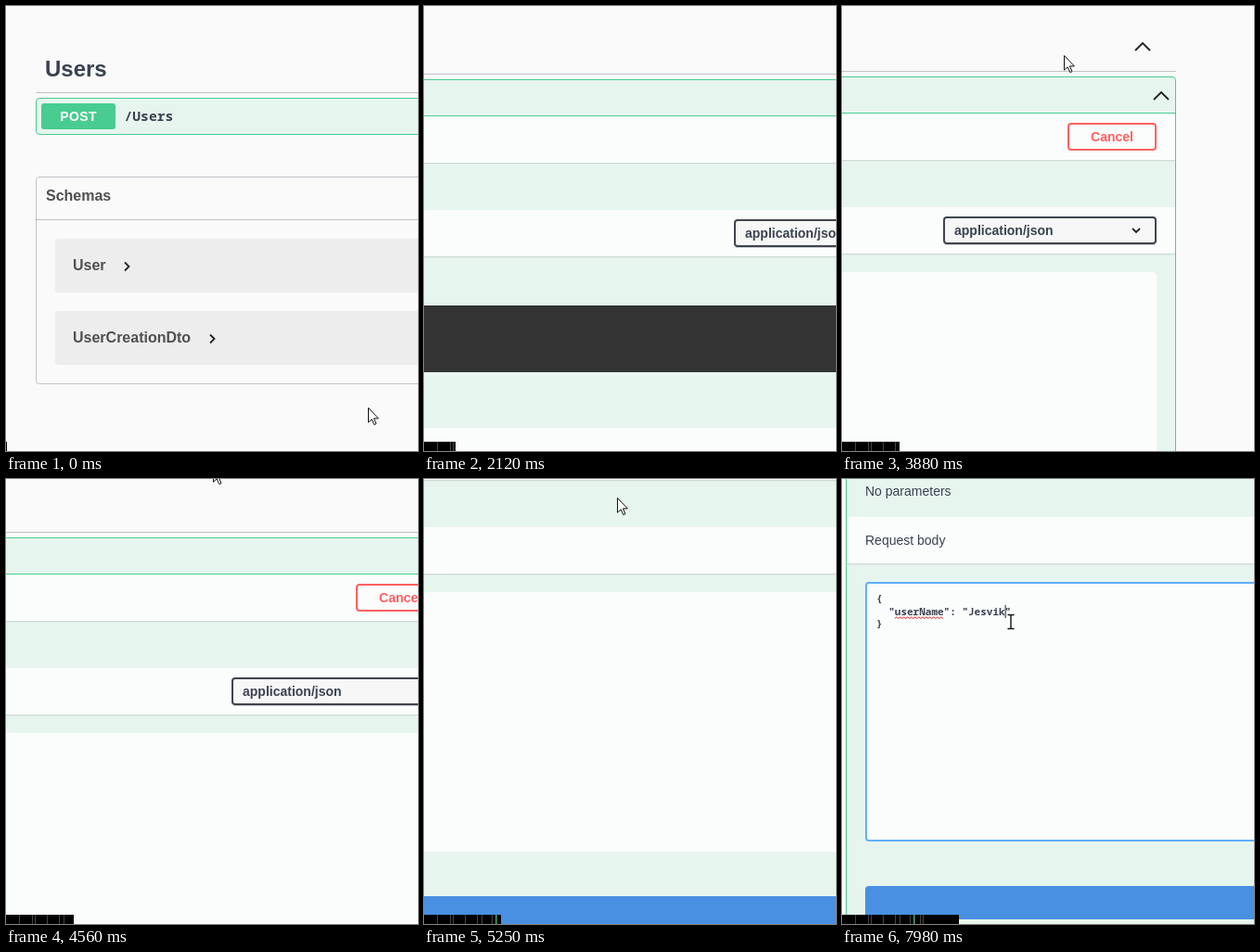
An HTML page that plays this animation: 444 px wide and 480 px high, repeating every 8000 ms.

```html
<!DOCTYPE html>
<html lang="en">
<head>
<meta charset="utf-8">
<title>API docs walkthrough</title>
<style>
html, body { margin: 0; width: 100%; height: 100%; overflow: hidden; background: #fafafa; }
svg { display: block; width: 444px; height: 480px; }
text { font-family: "Liberation Sans", Arial, sans-serif; fill: #3b4151; white-space: pre; }
.mono { font-family: "Noto Sans Mono", "DejaVu Sans Mono", monospace; font-weight: 600; }
.b { font-weight: 700; }
.line { fill: none; stroke: #3b4151; stroke-opacity: .3; }
.chev { fill: none; stroke: #222; stroke-width: 1.8; }
</style>
</head>
<body>
<svg id="stage" viewBox="0 0 444 480"></svg>
<script>
const LOOP = 8000, LEFT = 32, RIGHT = 1452, IN_L = 53, IN_R = 1431;
const CHAR = 6.6, NAME = 'Jesvik', PLACEHOLDER = 'string';
const $ = id => document.getElementById(id);

const rect = (x, y, w, h, fill, extra = '') =>
  `<rect x="${x}" y="${y}" width="${w}" height="${h}" fill="${fill}" ${extra}/>`;
const text = (x, y, size, str, cls = '', extra = '') =>
  `<text x="${x}" y="${y}" font-size="${size}" class="${cls}" ${extra}>${str}</text>`;
const path = (d, cls, extra = '') => `<path d="${d}" class="${cls}" ${extra}/>`;
const group = (id, body) => `<g id="${id}">${body}</g>`;
const frame = (x, y, w, h, stroke, width, fill = 'none', r = 4) =>
  rect(x + width / 2, y + width / 2, w - width, h - width, fill,
    `stroke="${stroke}" stroke-width="${width}" rx="${r - width / 2}"`);

const band = (y, h) =>
  rect(LEFT + 1, y, RIGHT - LEFT - 2, h, '#fff', 'fill-opacity=".8"') +
  rect(LEFT + 1, y + h, RIGHT - LEFT - 2, 1, '#000', 'fill-opacity=".1"') +
  rect(LEFT + 1, y + h + 1, RIGHT - LEFT - 2, 1, '#000', 'fill-opacity=".04"');

const model = (y, name, chevX) =>
  rect(IN_L, y, IN_R - IN_L, 58, '#ededed', 'rx="4"') +
  text(72, y + 34, 16, name, 'b', 'style="fill:#505050"') +
  path(`M${chevX - 3} ${y + 25.5}l4.5 4.5l-4.5 4.5`, 'chev', 'stroke-width="2"');

const opBox = h => frame(LEFT, 99, RIGHT - LEFT, h, '#49cc90', 1, '#e7f5ef');

const summary =
  rect(38, 105, 80, 28, '#49cc90', 'rx="3"') +
  text(78, 124, 14, 'POST', 'b', 'text-anchor="middle" style="fill:#fff" letter-spacing=".4"') +
  text(127.5, 124, 14.67, '/Users', 'mono b');

const closed = opBox(40) +
  frame(LEFT, 184, RIGHT - LEFT, 224, '#c1c3c8', 1) +
  text(43, 210, 16, 'Schemas', 'b', 'style="fill:#505050"') +
  path(`M${LEFT} 230.5H${RIGHT}`, 'line') +
  model(251, 'User', 131) + model(329, 'UserCreationDto', 223);

const opened = opBox(900) +
  rect(LEFT, 138, RIGHT - LEFT, 1, '#49cc90') +
  path('M1428 124l8 -8l8 8', 'chev') +
  band(139, 50) + band(240, 50) +
  text(IN_L, 169, 14, 'Parameters', 'b') + rect(45, 183, 91, 4, '#49cc90') +
  text(IN_L, 217, 14, 'No parameters') + text(IN_L, 270, 14, 'Request body') +
  frame(1201, 250, 230, 30, '#41444e', 2, '#f7f7f7') +
  rect(1203, 280, 226, 1, '#000', 'fill-opacity=".2"') +
  text(1213, 270, 14, 'application/json', 'b') +
  path('M1405 263l4 4l4 -4', 'chev');

const preview =
  text(IN_L, 328, 12, 'Example Value', 'b') +
  rect(142, 317, 1, 14, '#b5bfbd') + text(148.5, 328, 12, 'Schema') +
  rect(IN_L, 343, IN_R - IN_L, 72, '#333', 'rx="4"') +
  text(59, 360, 11, '{', 'mono b', 'style="fill:#fff"') +
  text(59, 374, 11, '  "userName": <tspan fill="#a2fca2">"string"</tspan>', 'mono b', 'style="fill:#fff"') +
  text(59, 388, 11, '}', 'mono b', 'style="fill:#fff"') +
  band(475, 50) + text(IN_L, 505, 14, 'Responses') +
  group('hover', rect(1321, 150, 110, 31, '#000', 'fill-opacity=".12" rx="5"')) +
  frame(1321, 149, 110, 30, '#808080', 2, '#fafdfc') +
  text(1376, 169, 14, 'Try it out', 'b', 'text-anchor="middle"');

const zigzag = 'M82.8 347.5' + 'l2 -1.7l2 1.7'.repeat(13);
const editor =
  frame(1335, 149, 96, 30, '#ff6060', 2) +
  text(1383, 169, 14, 'Cancel', 'b', 'text-anchor="middle" style="fill:#ff6060"') +
  rect(IN_L, 310, IN_R - IN_L, 280, '#fafdfc', 'rx="4"') +
  group('ring', frame(IN_L, 310, IN_R - IN_L, 280, '#61affe', 2)) +
  group('code',
    text(63, 330, 11, '{', 'mono') + text(63, 343.5, 11, '', 'mono', 'id="field"') +
    text(63, 357, 11, '}', 'mono') +
    group('marks', path(zigzag, '', 'fill="none" stroke="#e02020"') +
      rect(0, 333, 1, 14, '#222', 'id="caret"'))) +
  rect(IN_L, 638, IN_R - IN_L, 36, '#4990e2', 'rx="4"') +
  text(742, 661, 14, 'Execute', 'b', 'text-anchor="middle" style="fill:#fff"');

const pointers =
  group('arrow', path('M.5 .5V16.2L4.2 12.8L6.8 18.6L9 17.6L6.4 11.9H11.4Z', '', 'fill="#fff" stroke="#111"')) +
  group('hand', path('M-1.6 1.2Q0 -1 1.6 1.2V8Q3.2 6.4 4.8 8.4Q6.4 7 7.7 9Q9.4 8 10.5 10V15Q10.5 18 8.6 20V23H-.6V20.5Q-3 18 -5.8 13.7Q-6.4 11.3 -4 11.5L-1.6 13.8Z', '', 'fill="#fff" stroke="#111" stroke-width="1.2"') +
    path('M1.6 8V12M4.8 8.4V12M7.7 9V12.5', '', 'fill="none" stroke="#111"')) +
  group('beam', path('M-3.5 -7.5H-1Q0 -7.5 0 -6.5Q0 -7.5 1 -7.5H3.5M0 -7V7M-3.5 7.5H-1Q0 7.5 0 6.5Q0 7.5 1 7.5H3.5', '', 'fill="none" stroke="#111" stroke-width="1.4"'));

const stripes = [14, 28, 31, 44, 57, 62, 73, 84, 87]
  .map(x => rect(x, 470, 1, 10, '#444')).join('') + rect(77, 470, 1.5, 10, '#3fa878');

$('stage').innerHTML =
  '<clipPath id="done"><rect id="bar" y="470" height="10"/></clipPath>' +
  rect(0, 0, 444, 480, '#fafafa') +
  group('page',
    text(42, 76, 24, 'Users', 'b') + path(`M${LEFT} 93.5H${RIGHT}`, 'line') +
    path('M1408 71l8 -8l8 8', 'chev') +
    group('closed', closed) +
    group('opened', opened + group('preview', preview) + group('editor', editor)) +
    summary) +
  `<g clip-path="url(#done)">${rect(0, 470, 444, 10, '#000') + stripes}</g>` +
  group('pointer', pointers);

const sine = u => (1 - Math.cos(Math.PI * u)) / 2;
const cubic = u => u < .5 ? 4 * u ** 3 : 1 - 4 * (1 - u) ** 3;
const ramp = (t, a, b, ease) => ease(Math.min(1, Math.max(0, (t - a) / (b - a))));
const show = (id, on) => $(id).style.display = on ? '' : 'none';
const move = (id, x, y) => $(id).setAttribute('transform', `translate(${x} ${y})`);

// Pointer stops: time, x, y on the stage
const stops = [
  [70, 390, 433], [850, 150, 111], [1150, 150, 111], [1640, 197, -18], [2550, 235, -26],
  [2930, 258, 132], [3600, 258, 132], [4130, 223, -13], [5060, 223, -13],
  [5650, 161, 125], [5860, 161, 125], [6150, 176, 143], [6350, 176, 143], [6600, 182, 154]
];

function pointerAt(t) {
  const i = stops.findIndex(s => s[0] > t);
  if (i === 0) return stops[0].slice(1);
  if (i < 0) return stops[stops.length - 1].slice(1);
  const [a, x0, y0] = stops[i - 1], [b, x1, y1] = stops[i];
  const k = ramp(t, a, b, sine);
  return [x0 + (x1 - x0) * k, y0 + (y1 - y0) * k];
}

function valueAt(t) {
  if (t < 7300) {
    const gone = Math.max(0, Math.floor((t - 6700) / 85) + 1);
    return PLACEHOLDER.slice(0, Math.max(0, PLACEHOLDER.length - gone));
  }
  return NAME.slice(0, Math.floor((t - 7300) / 100));
}

function draw(t) {
  const camX = 1092 * ramp(t, 1430, 2530, cubic) - 1064 * ramp(t, 4233, 5653, sine);
  const camY = 23 * ramp(t, 1370, 2370, sine) + 176 * ramp(t, 4182, 5610, cubic);
  move('page', -Math.round(camX), -Math.round(camY));

  const isOpen = t >= 1000, editing = t >= 3450, focus = t >= 6270;
  show('closed', !isOpen);
  show('opened', isOpen);
  show('preview', !editing);
  show('editor', editing);
  show('hover', t > 2900);
  show('ring', focus);
  show('marks', focus);
  move('code', focus ? 2 : 0, focus ? 2 : 0);

  const value = valueAt(t);
  $('field').textContent = `  "userName": "${value}"`;
  $('caret').setAttribute('x', 63 + (15 + value.length) * CHAR);

  const [x, y] = pointerAt(t);
  move('pointer', Math.round(x), Math.round(y));
  const hand = (t > 830 && t < 1230) || (t > 2890 && t < 3700);
  const beam = t > 5560;
  show('hand', hand);
  show('beam', beam);
  show('arrow', !hand && !beam);

  $('bar').setAttribute('width', Math.round(1 + t * .0157));
}

const start = performance.now();
function tick() {
  draw((performance.now() - start) % LOOP);
  requestAnimationFrame(tick);
}
draw(0);
requestAnimationFrame(tick);
</script>
</body>
</html>
```
